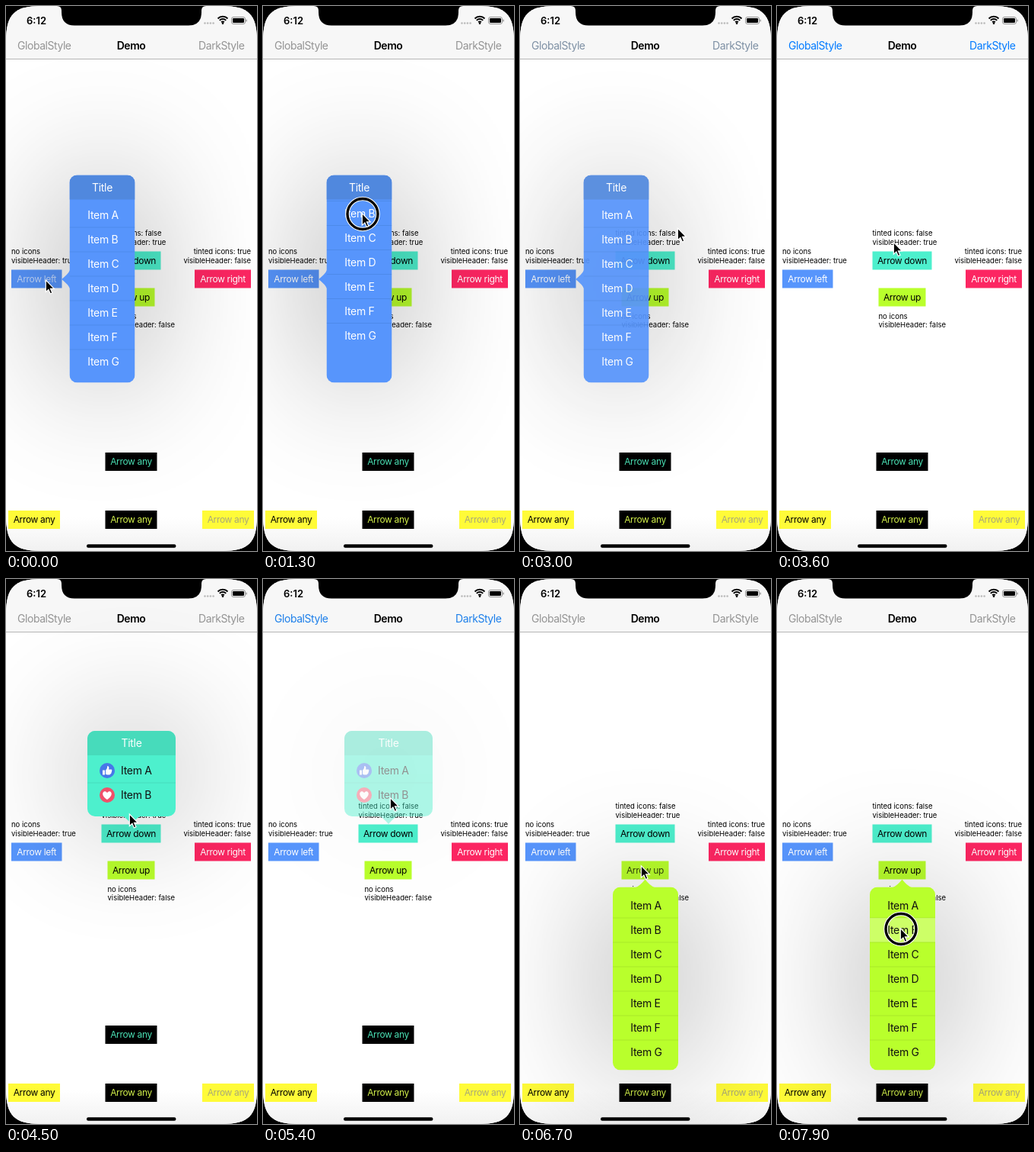
Animation of 330x714 px, one loop 8000 ms. Source, as an HTML page:

```html
<!DOCTYPE html>
<html lang="en">
<head>
<meta charset="utf-8">
<style>
html, body { margin: 0; width: 100%; height: 100%; overflow: hidden; background: #000; }
svg { display: block; font-family: Inter, sans-serif; }
</style>
</head>
<body>
<svg id="stage" width="330" height="714" viewBox="0 0 330 714"></svg>
<script>
const LOOP = 8000;
const BLUE = '#5795fc', TEAL = '#4df0cd', LIME = '#b9ff2c', PINK = '#fc2662', YELLOW = '#fffb38';

const text = (x, y, str, size, fill, extra = '') =>
  `<text x="${x}" y="${y + size * .36}" font-size="${size}" fill="${fill}" ${extra}>${str}</text>`;
const rect = (x, y, w, h, fill, extra = '') =>
  `<rect x="${x}" y="${y}" width="${w}" height="${h}" fill="${fill}" ${extra}/>`;
const label = (x, y, first, second, anchor = 'start') =>
  [first, second].map((s, i) => text(x, y + 11.3 * i, s, 9.5, '#000', `text-anchor="${anchor}"`)).join('');
const button = (x, y, w, str, bg, fg, id = '') =>
  rect(x, y, w, 24, bg) +
  text(x + w / 2, y + 12, str, 12, fg, `id="${id}" text-anchor="middle" letter-spacing="-.35"`);

const icons = [
  `<circle r="10" fill="#4778e8"/><path fill="#fff" d="M-6-.5h3v6h-3zM-2-.5C0-2 0-4 .3-6 2-6.5 3-4 2-1.5h3.5q1.5 1 .3 2.2 .6 1-.4 1.8 .4 1.2-.8 1.6Q4.500 5.500 3 5.500H0L-2 4.800z"/>`,
  `<circle r="10" fill="#f0506a"/><path fill="#fff" d="M0 6C-9 0-5.500-5.500-2.500-4.800Q-.7-4.500 0-2.800 .7-4.500 2.500-4.800C5.500-5.500 9 0 0 6z"/>`
];

const menus = [
  { x: 83.5, y: 221.5, w: 86, h: 272, first: 274, count: 7, textX: 107.3, bg: BLUE, fg: '#fff', line: '#4c87e6',
    header: '#5088de', arrow: 'M84 346Q82 351 73 358Q82 365 84 370z' },
  { x: 107, y: 199, w: 116, h: 112, first: 251, count: 2, textX: 151, bg: TEAL, fg: '#111', line: '#45d8b8',
    header: '#47dbbb', arrow: 'M153 310.500Q158 313 165 321Q172 313 177 310.500z', icons: true },
  { x: 122, y: 403.5, w: 86, h: 240, first: 428, count: 7, textX: 145.3, bg: LIME, fg: '#111', line: '#a5e329',
    arrow: 'M152 404Q158 402 164.500 393.500Q171 402 177 404z' }
];

function menuMarkup(m, i) {
  const top = m.y + (m.header ? 32 : 0);
  let rows = '';
  for (let n = 0; n < m.count; n++) {
    const y = m.first + 32 * n;
    if (i === 2 && n === 1) rows += rect(m.x, y - 16, m.w, 32, '#fff', 'id="highlight" opacity="0"');
    if (m.icons) rows += `<g transform="translate(133 ${y})">${icons[n]}</g>`;
    rows += text(m.textX, y, 'Item ' + 'ABCDEFG'[n], 14, m.fg, 'letter-spacing="-.3"');
    if (n < m.count - 1) rows += rect(m.x, y + 15.6, m.w, .8, m.line);
  }
  const header = m.header ? rect(m.x, m.y, m.w, 32, m.header) +
    text(m.x + m.w / 2, m.y + 16, 'Title', 14, '#fff', 'text-anchor="middle" letter-spacing="-.3"') : '';
  return `<clipPath id="box${i}">${rect(m.x, m.y, m.w, m.h, '#000', 'rx="10"')}</clipPath>
    <clipPath id="list${i}">${rect(m.x, top, m.w, m.y + m.h - top, '#000')}</clipPath>
    <g id="shadow${i}">${rect(m.x, m.y, m.w, m.h, '#000', 'rx="10" opacity=".42" filter="url(#blur)"')}</g>
    <g id="menu${i}"><path d="${m.arrow}" fill="${m.bg}"/>
      <g clip-path="url(#box${i})">${rect(m.x, m.y, m.w, m.h, m.bg)}
        <g clip-path="url(#list${i})"><g id="rows${i}">${rows}</g></g>${header}</g></g>`;
}

const wifi = [2.5, 5.8, 9].map(r =>
  `<path d="M${285 - r * .72} ${23 - r * .72}A${r} ${r} 0 0 1 ${285 + r * .72} ${23 - r * .72}" fill="none" stroke="#000" stroke-width="2"/>`).join('') +
  '<circle cx="285" cy="22.800" r="1.300"/>';
const navText = (x, str, anchor, extra) =>
  text(x, 51.5, str, 14, '#000', `text-anchor="${anchor}" letter-spacing="-.45" ${extra}`);

stage.innerHTML = `
  <filter id="blur" filterUnits="userSpaceOnUse" x="-300" y="-150" width="950" height="1150" color-interpolation-filters="sRGB">
    <feGaussianBlur stdDeviation="85"/></filter>
  <linearGradient id="floor" x2="0" y2="1"><stop stop-color="#fff"/><stop offset="1" stop-color="#f1f1f1"/></linearGradient>
  <clipPath id="screen"><path d="M0 46C0 11 11 0 46 0H284C319 0 330 11 330 46V668C330 703 319 714 284 714H46C11 714 0 703 0 668z"/></clipPath>
  <g clip-path="url(#screen)">
    ${rect(0, 0, 330, 714, '#fff')}
    ${rect(0, 670, 330, 44, 'url(#floor)')}
    ${label(7, 322, 'no icons', 'visibleHeader: true')}
    ${label(125.5, 298, 'tinted icons: false', 'visibleHeader: true')}
    ${label(322, 322, 'tinted icons: true', 'visibleHeader: false', 'end')}
    ${label(133.5, 406.4, 'no icons', 'visibleHeader: false')}
    ${button(7, 345.5, 66.5, 'Arrow left', BLUE, '#fff', 'leftText')}
    ${button(125.5, 321.5, 78, 'Arrow down', TEAL, '#000', 'downText')}
    ${button(133.5, 369.5, 62, 'Arrow up', LIME, '#000', 'upText')}
    ${button(248, 345.5, 74, 'Arrow right', PINK, '#fff')}
    ${button(130.5, 585, 68, 'Arrow any', '#000', '#4ae0b4')}
    ${button(3, 661, 68, 'Arrow any', YELLOW, '#000')}
    ${button(130.5, 661, 68, 'Arrow any', '#000', '#d2f04a')}
    ${button(258, 661, 68, 'Arrow any', YELLOW, '#a9a878')}
    ${rect(0, 0, 330, 69, '#f7f7f7')}${rect(0, 69, 330, 1, '#b6b6b6')}
    ${navText(15, 'GlobalStyle', 'start', 'class="tint"')}
    ${navText(164.5, 'Demo', 'middle', 'font-weight="600"')}
    ${navText(313.5, 'DarkStyle', 'end', 'class="tint"')}
    ${text(27, 19, '6:12', 13, '#000', 'font-weight="600"')}
    ${[261.5, 265.2, 268.9, 272.6].map(x => `<circle cx="${x}" cy="22.500" r="1.300" fill="#bbb"/>`).join('')}
    ${wifi}
    ${rect(296.5, 14.5, 18, 9, 'none', 'rx="2.500" stroke="#888" stroke-width=".9"')}
    ${rect(298, 16, 15, 6, '#000', 'rx="1.200"')}${rect(315.5, 17.5, 1.2, 3, '#888', 'rx=".6"')}
    ${menus.map(menuMarkup).join('')}
    <path d="M67 0Q73 0 73 6V8Q73 25.500 90 25.500H240Q257 25.500 257 8V6Q257 0 263 0z"/>
    ${rect(106, 705.3, 117.5, 4.4, '#000', 'rx="2.200"')}
  </g>
  <g id="cursor">
    <g id="ring" fill="none"><circle r="20" stroke="#fff" stroke-width="5.500"/><circle r="20" stroke="#000" stroke-width="3.400"/></g>
    <path transform="translate(-.7 -.8)" d="M0 0V15.500L3.600 12.200L6 17.800L8.600 16.700L6.200 11.200H11z" stroke="#fff" stroke-width="1.200"/>
  </g>`;

const $ = id => document.getElementById(id);
const ease = p => p * p * (3 - 2 * p);
const ramp = (t, a, b) => Math.min(1, Math.max(0, (t - a) / (b - a)));
const within = (t, a, b) => t >= a && t < b;

// keys: [time, value, ...]
function track(t, keys) {
  const i = keys.findIndex(k => k[0] > t);
  if (i < 0) return keys.at(-1).slice(1);
  if (i === 0) return keys[0].slice(1);
  const [a, b] = [keys[i - 1], keys[i]];
  const p = ease(ramp(t, a[0], b[0]));
  return a.slice(1).map((v, n) => v + (b[n + 1] - v) * p);
}

const pointer = [
  [0, 53, 360], [100, 53, 360], [600, 131, 342], [800, 131, 342], [1300, 131, 272.5], [1750, 132, 330],
  [1900, 134, 330], [2400, 185, 300], [2700, 208, 292], [3000, 208, 292], [3600, 154, 310.5],
  [3850, 158, 331], [4200, 158, 331], [4800, 168, 287], [5400, 168, 287.5], [5600, 168, 290],
  [6050, 160, 376.5], [6750, 160, 376.5], [7200, 165, 470], [7300, 165, 470], [7550, 163, 458.5]
];
const scroll = [[800, 0], [1300, -34.5], [1750, 6], [1900, 6], [2600, 0]];
const presses = [[700, 1800], [2800, 2950], [3900, 4050], [5050, 5200], [6150, 6300], [7550, 8000]];
const fade = (t, open, close) => ease(ramp(t, open, open + 300)) * (1 - ease(ramp(t, close, close + 300)));

function draw(t) {
  const alphas = [fade(t, -400, 2950), fade(t, 4000, 5240), fade(t, 6280, 9000)];
  alphas.forEach((a, i) => {
    $('menu' + i).setAttribute('opacity', a);
    $('shadow' + i).setAttribute('opacity', a * a);
  });
  const dim = Math.max(...alphas) ** 2;
  const tint = [0, 122, 255].map(c => Math.round(c + (148 - c) * dim));
  document.querySelectorAll('.tint').forEach(e => e.setAttribute('fill', `rgb(${tint})`));

  $('rows0').setAttribute('transform', `translate(0 ${track(t, scroll)[0]})`);
  $('highlight').setAttribute('opacity', t >= 7750 ? .28 : 0);
  $('leftText').setAttribute('opacity', .65 + .35 * ramp(t, 50, 350));
  $('downText').setAttribute('opacity', within(t, 3900, 4400) ? .6 : 1);
  $('upText').setAttribute('opacity', within(t, 6150, 6900) ? .65 + .35 * ramp(t, 6650, 6900) : 1);

  $('cursor').setAttribute('transform', `translate(${track(t, pointer)})`);
  $('ring').setAttribute('opacity', presses.some(([a, b]) => within(t, a, b)) ? 1 : 0);
}

const start = performance.now();
function tick() {
  draw((performance.now() - start) % LOOP);
  requestAnimationFrame(tick);
}
tick();
</script>
</body>
</html>
```
